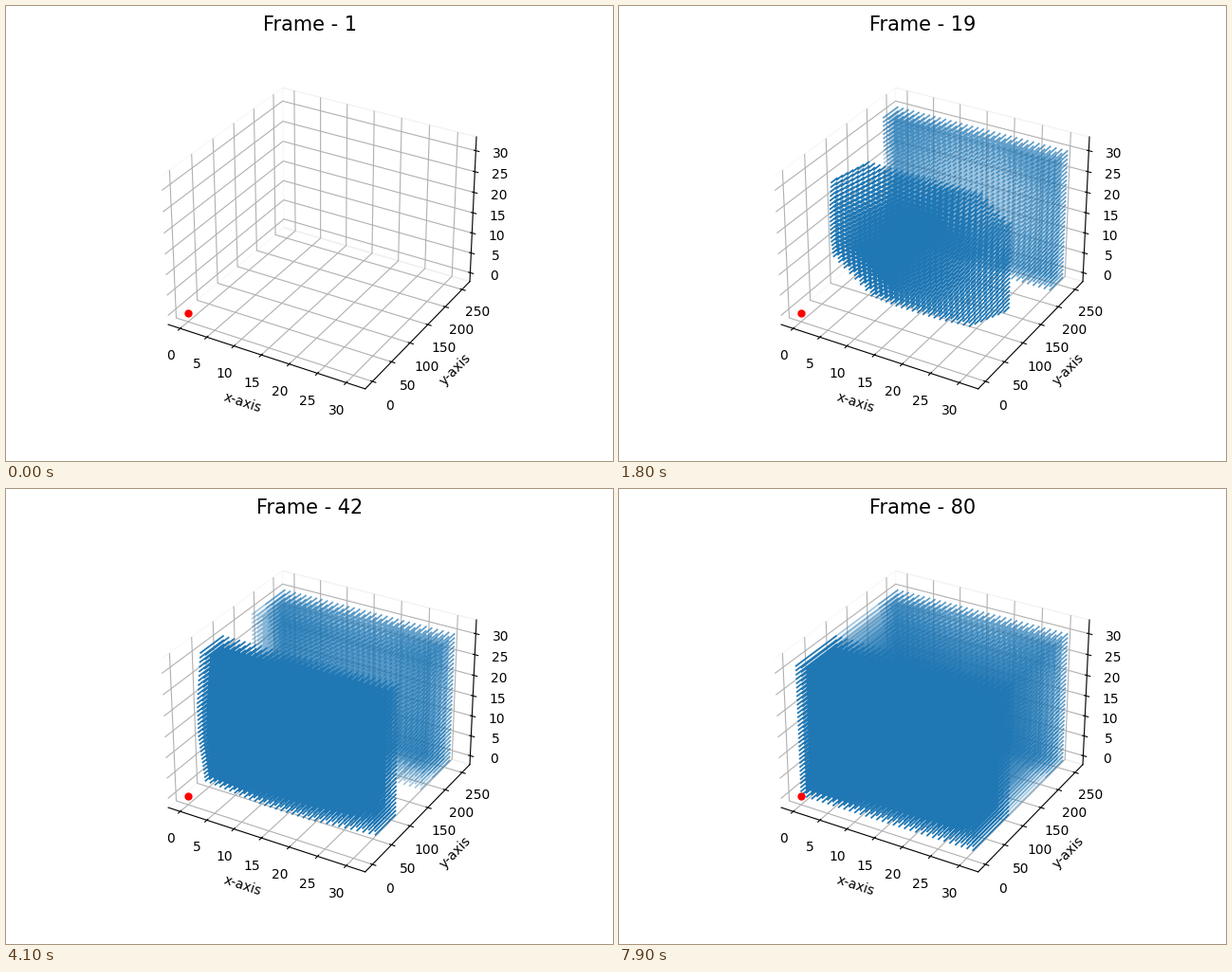
A matplotlib script that plays this animation: 640 by 480 pixels, repeating every 8 s.

```python
import numpy as np
import matplotlib.pyplot as plt
from matplotlib.animation import FuncAnimation

SIZE, DEPTH, FRAMES = 32, 255, 80
BLUE = "#1f77b4"
WALL_TOP, WALL_EDGE = 250, 246     # back sheet: start and moving edge
FRONT_TOP, FRONT_EDGE = 96, 98     # front sheet: start and moving edge
SPEED = 2                          # depth units per step

# Step at which the growing 9x9 seed reaches each cell (4-neighbour growth)
Z, X = (g.ravel() for g in np.mgrid[0:SIZE, 0:SIZE])


def outside(v):
    return np.maximum(0, np.abs(v - 16) - 4)


REACHED = outside(X) + outside(Z) + 1


def limits(top):
    """Data range with a 5 % margin plus the pane overhang."""
    pad = top * (0.05 + 1.1 / 48)
    return -pad, top + pad


def draw_dashes(line, cells, near, far):
    """Show one depth-wise dash per cell, split by NaN."""
    near, far = (np.broadcast_to(v, X.shape)[cells] for v in (near, far))
    gap = np.full(len(near), np.nan)
    ys = np.column_stack([near, far, gap]).ravel()
    line.set_data_3d(np.repeat(X[cells], 3), ys, np.repeat(Z[cells], 3))


def blue_line(alpha, zorder):
    return ax.plot([], [], [], color=BLUE, lw=1.3, alpha=alpha,
                   zorder=zorder, solid_capstyle="butt")[0]


fig = plt.figure(figsize=(6.4, 4.8), dpi=100)
ax = fig.add_subplot(projection="3d", computed_zorder=False)
ax.set(xlim=limits(SIZE - 1), ylim=limits(DEPTH), zlim=limits(SIZE - 1),
       xlabel="x-axis", ylabel="y-axis")
for axis in (ax.xaxis, ax.yaxis, ax.zaxis):
    axis.pane.fill = False

title = fig.suptitle("", x=0.5005, fontsize=15)
# One translucent line per layer, so that stacked layers add up
thin = [blue_line(0.4, 2) for _ in range(SIZE)]
wall = [blue_line(0.7, 2) for _ in range(SIZE)]
front = blue_line(1, 3)
lines = thin + wall + [front]
ax.plot([0], [0], [0], "o", color="red", ms=5, zorder=4)


def update(n):
    title.set_text(f"Frame - {n + 1}")
    if n == 0:
        for line in lines:
            line.set_data_3d([], [], [])
        return lines

    on = REACHED <= n
    # The back sheet thins out where the seed has already passed
    turn = WALL_EDGE - SPEED * np.minimum(n, REACHED)
    for z in range(SIZE):
        layer = Z == z
        draw_dashes(wall[z], layer, turn, WALL_TOP)
        draw_dashes(thin[z], layer & on, WALL_EDGE - SPEED * n, turn)

    edge = np.maximum(0, FRONT_EDGE + REACHED - SPEED * n)
    draw_dashes(front, on, edge, FRONT_TOP)
    return lines


anim = FuncAnimation(fig, update, frames=FRAMES, interval=100,
                     repeat=True, repeat_delay=0, blit=False)
plt.show()
```
